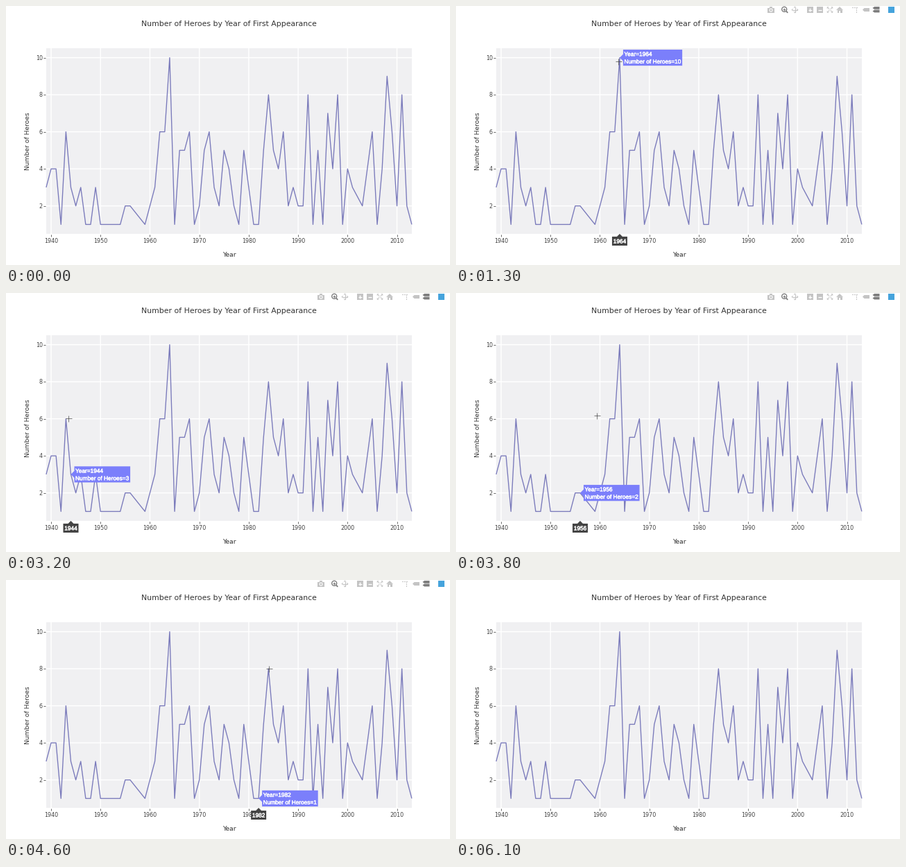
Animation of 640x374 px, one loop 6.2 s. Source, as a matplotlib script:

```python
import numpy as np
import matplotlib.pyplot as plt
from matplotlib.animation import FuncAnimation
from matplotlib.patches import Circle, Polygon, Rectangle
from matplotlib.patheffects import withStroke

W, H, DPI = 640, 374, 100
FRAMES, STEP = 62, 100
PX = 72 / DPI

LINE, HOVER, DARK, INK = "#7a7abb", "#7b7ffb", "#444444", "#333333"
LIGHT, ACTIVE, BLUE = "#c4c4c4", "#7c7c7c", "#45a3dc"
LEFT, RIGHT, TOP, BOTTOM = 58, 585, 61, 329
FIRST_YEAR = 1939

# Heroes per year from FIRST_YEAR on; 0 means the year has no point
counts = np.array([
    3, 4, 4, 1, 6, 3, 2, 3, 1, 1, 3, 1, 1, 1, 1, 1, 2, 2, 0, 0, 1, 2, 3, 6, 6,
    10, 1, 5, 5, 6, 1, 2, 5, 6, 3, 2, 5, 4, 2, 1, 5, 3, 1, 1, 5, 8, 5, 4, 6, 2,
    3, 2, 2, 8, 1, 5, 1, 7, 4, 8, 1, 4, 3, 0, 2, 4, 6, 1, 4, 9, 6, 2, 8, 2, 1])
years = FIRST_YEAR + np.flatnonzero(counts)
values = counts[counts > 0]


def px(year):
    return 65 + (year - 1940) * 7.122


def py(value):
    return 342.2 - 26.76 * value


fig = plt.figure(figsize=(W / DPI, H / DPI), dpi=DPI, facecolor="white")
ax = fig.add_axes([0, 0, 1, 1])
ax.set_xlim(0, W)
ax.set_ylim(H, 0)
ax.axis("off")


def text(x, y, s, size, color=DARK, font="DejaVu Sans", ha="center", z=4, **kw):
    return ax.text(x, y, s, fontsize=size * PX, color=color, family=font,
                   ha=ha, va="baseline", zorder=z, **kw)


def line(xs, ys, color, width, z=2, **kw):
    return ax.plot(xs, ys, color=color, lw=width * PX, zorder=z,
                   solid_capstyle="butt", **kw)[0]


def shape(patch, color, z):
    patch.set(facecolor=color, edgecolor="none", zorder=z)
    return ax.add_patch(patch)


def poly(pts, color, z=6):
    return shape(Polygon(pts, closed=True), color, z)


def rect(x, y, w, h, color, z=6):
    return shape(Rectangle((x, y), w, h), color, z)


def disc(x, y, r, color, z=6):
    return shape(Circle((x, y), r), color, z)


def plus(x, y, r, color, width, z):
    return [line([x - r, x + r], [y, y], color, width, z),
            line([x, x], [y - r, y + r], color, width, z)]


def draw_chart():
    rect(LEFT, TOP, RIGHT - LEFT, BOTTOM - TOP, "#f0f0f2", 1)
    for year in range(1940, 2011, 10):
        x = px(year)
        line([x, x], [TOP, BOTTOM], "white", 1.5, snap=False)
        line([x, x], [BOTTOM + 0.5, BOTTOM + 3.5], DARK, 0.8)
        text(x, 342.2, str(year), 8)
    for value in range(2, 11, 2):
        y = py(value)
        line([LEFT, RIGHT], [y, y], "white", 1.5, snap=False)
        line([LEFT - 4, LEFT - 1], [y, y], DARK, 0.8)
        text(53, y + 3, str(value), 8, ha="right")
    line(px(years), py(values), LINE, 1.35, 3, solid_joinstyle="round")
    text(321.7, 29.4, "Number of Heroes by Year of First Appearance", 10.92, INK)
    text(321.5, 362.4, "Year", 9.3, INK)
    text(34.3, 194.8, "Number of Heroes", 9.1, INK, rotation=90,
         rotation_mode="anchor")


def tag(x, y, h, color):
    return poly([(x, y + h / 2), (x + 2.5, y), (x + 10, y), (x + 10, y + h),
                 (x + 2.5, y + h)], color)


def draw_toolbar():
    mid = 5.5
    # camera
    parts = [rect(449, 2.5, 10, 7, LIGHT), rect(451.8, 1.2, 4.4, 2, LIGHT),
             disc(454, 6, 2.6, "white", 7), disc(454, 6, 1.5, LIGHT, 8)]
    # magnifier
    parts += [disc(473.2, 4.8, 4.2, ACTIVE), disc(473.2, 4.8, 2.9, "white", 7),
              line([476, 478.3], [7.6, 9.8], ACTIVE, 1.8, 8)]
    parts += plus(473.2, 4.8, 1.9, ACTIVE, 1.1, 8)
    # move and autoscale arrows
    parts += plus(488.5, mid, 3.5, LIGHT, 1.1, 6)
    for k in range(4):
        a = k * np.pi / 2
        for cx, turn, reach in ((488.5, 0, 5), (539, np.pi / 4, 6)):
            d = np.array([np.cos(a + turn), np.sin(a + turn)])
            n = np.array([-d[1], d[0]])
            c = np.array([cx, mid])
            base = c + (reach - 2) * d
            parts.append(poly([c + reach * d, base + 2 * n, base - 2 * n], LIGHT))
            parts.append(line(*zip(c + d, base), LIGHT, 1, 6))
    # zoom buttons
    parts += [rect(505.5, 1, 9, 9, LIGHT), rect(519.5, 1, 9, 9, LIGHT),
              line([521.5, 526.5], [mid, mid], "white", 1.4, 7)]
    parts += plus(510, mid, 2.5, "white", 1.4, 7)
    # house
    parts += [poly([(548, 5.8), (553, 1), (558, 5.8)], LIGHT),
              rect(549.5, 5.5, 7, 4.3, LIGHT), rect(552, 7, 2, 2.8, "white", 7)]
    # dotted spikes
    for i in range(3):
        parts += [rect(571 + 3 * i, 2, 1.8, 1.4, LIGHT),
                  rect(577, 2 + 3 * i, 1.4, 1.8, LIGHT)]
    # hover modes and badge
    parts += [tag(586, 3, 5, LIGHT), tag(600.5, 1, 3.8, ACTIVE),
              tag(600.5, 5.6, 3.8, ACTIVE), rect(622.5, 0.5, 9.5, 9.5, BLUE)]
    return parts


def hover_text(ha):
    return text(0, 0, "", 8.3, "white", "Liberation Sans", ha, 11,
                path_effects=[withStroke(linewidth=0.3, foreground="white")])


draw_chart()
toolbar = draw_toolbar()
box = poly([(0, 0)] * 3, HOVER, 10)
year_box = poly([(0, 0)] * 3, DARK, 10)
row1, row2, year_text = (hover_text(ha) for ha in ("left", "left", "center"))
hover = [box, year_box, row1, row2, year_text]
cross = plus(0, 0, 4.5, "#444444", 0.7, 13)

# Pointer moves: start and end in ms, goal, smooth or steady, bend of the path
START = np.array([262, 372])
MOVES = [
    (700, 1250, (234, 80), True, 1),
    (2400, 2870, (90.4, 181), True, 1.35),
    (3300, 4580, (379, 128), False, 2.75),
    (5400, 5850, (402, 372), True, 1),
]


def pointer(t):
    pos = START
    for begin, end, goal, smooth, bend in MOVES:
        u = np.clip((t - begin) / (end - begin), 0, 1)
        if smooth:
            u = u * u * (3 - 2 * u)
        pos = pos + (np.array(goal) - pos) * [u, u ** bend]
        if u < 1:
            break
    return pos


def inside(pos):
    return LEFT <= pos[0] <= RIGHT and TOP <= pos[1] <= BOTTOM


def place_hover(pos):
    i = np.argmin(abs(px(years) - pos[0]))
    year, value = years[i], values[i]
    x, y = px(year), py(value)
    l, r = x + 5, x + 81 + 4.6 * len(str(value))
    t, b = y - 11.6, y + 11.6
    box.set_xy([(x, y), (l, y - 5), (l, t), (r, t), (r, b), (l, b), (l, y + 5)])
    row1.set_text(f"Year={year}")
    row1.set_position((x + 6.5, y - 2.4))
    row2.set_text(f"Number of Heroes={value}")
    row2.set_position((x + 6.5, y + 8.4))
    t, b = BOTTOM + 4, BOTTOM + 17
    year_box.set_xy([(x, BOTTOM), (x + 4, t), (x + 11, t), (x + 11, b),
                     (x - 11, b), (x - 11, t), (x - 4, t)])
    year_text.set_text(str(year))
    year_text.set_position((x, BOTTOM + 13.5))


def update(frame):
    t = frame * STEP
    alpha = np.interp(t, [700, 1000, 5900, 6100], [0, 1, 1, 0])
    for part in toolbar:
        part.set_alpha(alpha)

    x, y = pointer(t)
    cross[0].set_data([x - 4.5, x + 4.5], [y, y])
    cross[1].set_data([x, x], [y - 4.5, y + 4.5])
    for art in cross:
        art.set_visible(inside((x, y)))

    # the label trails the pointer by one step
    late = pointer(t - STEP)
    for art in hover:
        art.set_visible(inside(late))
    if inside(late):
        place_hover(late)
    return toolbar + hover + cross


anim = FuncAnimation(fig, update, frames=FRAMES, interval=STEP, repeat=True,
                     repeat_delay=0, blit=False)
plt.show()
```
